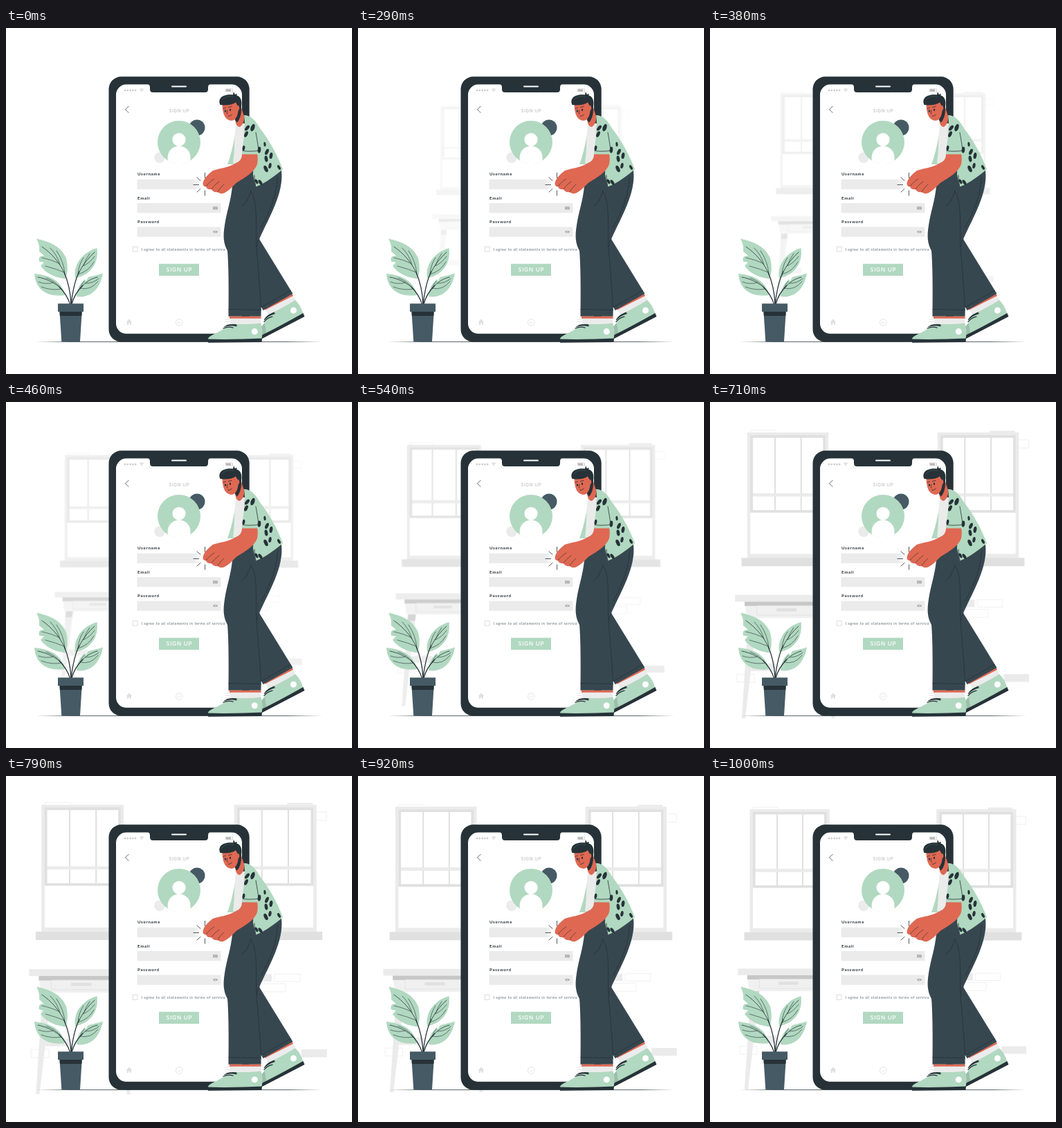
Recreate the animation shown at these times as an HTML page. Size 500 by 500 pixels, loop 1.04 s.

```html
<!DOCTYPE html>
<html lang="en">
<head>
<meta charset="utf-8">
<title>Sign up</title>
<style>
  html, body { margin: 0; width: 100%; height: 100%; overflow: hidden; background: #fff; }
  svg { display: block; width: 100%; height: 100%; }
  text { font-family: Lato, "Open Sans", sans-serif; }
  .ink { fill: #263238; }
  .slate { fill: #455a64; }
  .mint { fill: #b1d8c0; }
  .skin { fill: #df6852; }
  .pale { fill: #ebebeb; }
  .frame { fill: #e0e0e0; }
  .white { fill: #fff; }
  .line { fill: none; stroke: #263238; stroke-width: .8; stroke-linecap: round; stroke-linejoin: round; }
  .fine { stroke-width: .6; }
  .bold { stroke-width: 1.3; }
  .brick { fill: none; stroke: #ebebeb; stroke-width: .7; }
  .label { font-size: 6.2px; font-weight: 700; letter-spacing: .65px; fill: #263238; }
  .caps { font-family: Inter, "Open Sans", sans-serif; font-weight: 500; }
  .icon { fill: none; stroke: #e0e0e0; stroke-width: .9; }
</style>
</head>
<body>
<svg viewBox="0 0 500 500">
  <defs>
    <g id="window">
      <path class="pale" fill-rule="evenodd" d="M57.5 48H172.8V226H57.5ZM62 161.5V220H168V161.5Z"/>
      <path class="frame" d="M62 52H168.5V161.5H62Z"/>
      <path class="white" d="M65.5 55.5H96V134.5H65.5ZM98 55.5H133V134.5H98ZM135 55.5H165V134.5H135ZM65.5 138.5H96V158H65.5ZM98 138.5H133V158H98ZM135 138.5H165V158H135Z"/>
      <path class="pale" d="M65.5 134.5H165V138.5H65.5Z"/>
      <path class="frame" d="M49.5 225.7H181V237.5H49.5Z"/>
    </g>
    <g id="shoe">
      <path class="skin" d="M323 416.800H368.500V420H323Z"/>
      <path class="pale" d="M324.500 419.700H368L369 430H323Z"/>
      <path class="mint" d="M292 450C292 443 311 441 321 429C327 426.500 333 428.500 340 428C350 428 360 427.500 368 426.500C371.500 434 371 444 369 451Z"/>
      <path class="ink" d="M292 449.500C318 450.500 344 449.500 370 448.500L369.500 454L292 454.700Z"/>
      <circle class="white" cx="359.300" cy="438.800" r="4.500"/>
      <path class="line bold" d="M316 431.500Q323 428.500 333 430.500M314 434Q321 431 328 433M319 429.800Q326 428 333 428.800"/>
    </g>
    <radialGradient id="glow">
      <stop offset=".3" stop-color="#fff"/>
      <stop offset="1" stop-color="#fff" stop-opacity="0"/>
    </radialGradient>
    <linearGradient id="floor">
      <stop offset="0" stop-color="#263238" stop-opacity="0"/>
      <stop offset=".12" stop-color="#263238"/>
      <stop offset=".88" stop-color="#263238"/>
      <stop offset="1" stop-color="#263238" stop-opacity="0"/>
    </linearGradient>
  </defs>

  <g id="room" opacity="0">
    <use href="#window"/>
    <use href="#window" transform="translate(500) scale(-1 1)"/>
    <path class="brick" d="M62 48V45H98V48M442 58.300H456.500V70H442M383.600 285H419.400V295.500H383.600ZM363 298.500H399V310H363ZM43 390.500H68V402H43Z"/>
    <path class="pale" d="M401.500 45.500H437V48H401.500ZM360 285H379.700V295.500H360ZM421.300 390.500H457V401.500H421.300ZM63 375.500H97V386H63Z"/>
    <!-- table -->
    <path class="pale" d="M59 310H71.500L54.800 453.300H49.800ZM165 310H177L182 453.300H177Z"/>
    <path fill="#d0d0d0" d="M59.500 311H71.300L70.300 321H58.500Z"/>
    <path fill="#f0f0f0" d="M53.800 288H205V311H57Z"/>
    <path fill="#c7c7c7" d="M53.800 287.500H205V294H53.800Z"/>
    <path class="pale" d="M40.300 278.300H215V287.800H40.300Z"/>
    <path fill="#f0f0f0" stroke="#e0e0e0" stroke-width=".8" d="M71.500 293.500H190V307H71.500Z"/>
    <path class="frame" d="M99 297.300H127.500V301.600H99Z"/>
  </g>

  <path fill="url(#floor)" d="M43 453.300H457V454.100H43Z"/>

  <!-- plant -->
  <g>
    <path class="mint" d="M44 304.500C61 308 80 315 87 333C90 345 89 355 86 362.500C74 361 60 357 50 344L55 338.500L48 337.500C47 333 48 331 50 330L55 329L48 323C49 316 47 310 44 304.500Z"/>
    <path class="mint" d="M131.500 318C134 336 126 356 100 361.500C97 344 108 325 131.500 318Z"/>
    <path class="mint" d="M41 355C59 357 79 362 85.500 386C66 389 43 383 41 355Z"/>
    <path class="mint" d="M140 354.500C136 378 121 391 102 388C102 377 107 369 114 363L115.500 366L119 360C126 358 133 357 140 354.500Z"/>
    <path class="line bold" d="M94 399C93 376 87 360 84 353M94 399C97 376 101 361 106 352M92.500 399C89 388 84 381 77 374M95 399C98 387 104 379 111 372"/>
    <path class="line" d="M84 353C76 337 66 326 52 316M106 352C112 341 119 332 128 324M77 374C68 367 57 362 46 360M111 372C117 366 124 362 132 360"/>
    <path class="line fine" d="M85 356Q84 338 73 322M78 342Q74 328 64 318M84 353Q72 348 57 344M76 340Q66 335 52 332M104 356Q119 352 127 338M111 344Q121 340 128 330M104 356Q105 342 112 332M112 343Q115 334 121 326M80 377Q72 366 58 361M80 377Q66 380 51 374M68 368Q58 371 47 367M107 376Q122 380 133 366M115 369Q126 369 134 362M107 376Q109 370 113 366"/>
    <path class="slate" d="M77.500 410H109.700L107 453.500H80.300Z"/>
    <path class="ink" d="M77.500 410H109.700L109.300 416H77.900Z"/>
    <path class="slate" d="M75 398.300H112V410H75Z"/>
  </g>

  <!-- phone -->
  <g>
    <rect class="ink" x="148.500" y="70.300" width="203.200" height="383.200" rx="18"/>
    <rect class="white" x="159" y="81.600" width="182" height="360.200" rx="15"/>
    <path class="ink" d="M205 81H295Q292 82 292 86V88.500Q292 93 287.500 93H212.500Q208 93 208 88.500V86Q208 82 205 81Z"/>
    <path stroke="#fff" stroke-width="2" stroke-linecap="round" d="M240 84.500H260"/>
    <path stroke="#c7c7c7" stroke-width="2.600" stroke-linecap="round" stroke-dasharray="0 3.800" d="M172 90H187.500"/>
    <path fill="none" stroke="#c7c7c7" stroke-width=".9" d="M193 89Q196 86.500 199 89M194.300 90.400Q196 89 197.700 90.400"/>
    <circle cx="196" cy="91.600" r=".7" fill="#c7c7c7"/>
    <path fill="none" stroke="#c7c7c7" stroke-width=".7" d="M317.500 88H327.500V92H317.500Z"/>
    <path fill="#b5b5b5" d="M318 88.500H325V91.500H318Z"/>
    <path fill="none" stroke="#a6a6a6" stroke-width="1.300" d="M177.500 113L172.400 117.800L177.500 122.600"/>
    <text class="caps" x="235.200" y="122" font-size="6.400" letter-spacing=".6" fill="#c0c0c0">SIGN UP</text>

    <circle class="slate" cx="276" cy="144" r="11.500"/>
    <circle class="pale" cx="222" cy="187.200" r="7.800"/>
    <circle class="mint" cx="250" cy="165" r="31"/>
    <circle class="white" cx="250" cy="161.300" r="9.600"/>
    <path class="white" d="M233.700 191.500V187A16.400 16.500 0 0 1 266.500 187V191.500A31 31 0 0 1 233.700 191.500Z"/>

    <path class="pale" d="M189.500 218.700H310.500V233H189.500ZM189.500 253H310.500V267.300H189.500ZM189.500 287.500H310.500V301.800H189.500Z"/>
    <text class="label" x="190" y="213.300">Username</text>
    <text class="label" x="190" y="247.800">Email</text>
    <text class="label" x="190" y="282.200">Password</text>
    <path fill="#b0b0b0" d="M299 258H306V262.300H299Z"/>
    <path fill="none" stroke="#dcdcdc" stroke-width=".5" d="M299 258L302.500 260.500L306 258"/>
    <ellipse cx="302.500" cy="294.500" rx="3.400" ry="1.700" fill="#b0b0b0"/>
    <circle class="pale" cx="302.500" cy="294.500" r=".8"/>
    <path fill="none" stroke="#d5d5d5" stroke-width=".8" d="M183.200 316.200H190.200V323.200H183.200Z"/>
    <text x="195.500" y="321.700" font-size="5.300" letter-spacing=".5" fill="#5f6d74">I agree to all statements in terms of service</text>
    <path class="mint" d="M221 340.700H279V358H221Z"/>
    <text class="caps" x="231.200" y="352.400" font-size="8.200" letter-spacing=".7" fill="#fff">SIGN UP</text>

    <path class="frame" d="M173.800 425L178 420.500L182.200 425H181V429H179V426.500H177V429H175V425Z"/>
    <circle class="icon" cx="250.300" cy="425.500" r="4.800"/>
    <path class="icon" d="M248 424.700L250.300 427L252.600 424.700M316.500 421H326M316.500 424.500H326M316.500 428H326"/>
    <circle cx="287" cy="226" r="16" fill="url(#glow)"/>
    <path class="line" d="M287.500 209.500V216.500M276 216L281 220.500M271 226.500H278.500M276 237L281 232.500M287.500 235V242M298.500 215.500L294 220"/>
  </g>

  <!-- man -->
  <g>
    <use href="#shoe" transform="translate(431 415) rotate(-27) translate(-370 -452)"/>
    <path fill="#263238" opacity=".15" d="M369 430L374 427L376 440L369 446Z"/>
    <path fill="#37474f" d="M327 229L334 215L360 205L398 206C402 238 380 274 366 305L414.500 384L371.500 408L368.800 403L368.500 416.800H321.500C322 390 322 345 320 322C314 311 313.500 300 316 285C319 265 325 250 327 229Z"/>
    <path class="line" d="M354 236C364 248 361 290 362 316C364 345 367 372 368.500 403M366 305C364 308 363 310 362.500 316M354 236C349 250 346 254 341 257M321.800 406.500L368.500 407.500M369.500 403L411.500 379.500M392 216C393 238 379 270 369 288"/>
    <use href="#shoe"/>

    <path class="mint" d="M335 137C330 156 328 176 320 197L334 197L343 150Z"/>
    <path class="pale" d="M333 136L345 138L344 192L328 196C331 176 329 156 333 136Z"/>
    <path class="mint" d="M344 126C354 126 361 134 367 145C381 163 392 183 400 204C390 213 375 224 361 229.500L357 212L358 183H341C342 165 347 148 344 126Z"/>
    <path class="line" d="M361 151C363 161 364 171 366 180M342 177.500C350 178.500 358 178.500 367 177M359 213C359 219 360 225 361 229"/>
    <g id="spots" class="ink"></g>

    <path class="skin" d="M341 182.500C341 190 337 193 331 196C320 202 308 203 299 206C292 211 287 217 285.500 221C283.500 226 285 229.500 289 229C290 233 294 234 297 233C299 237 303 238 306 237C309 240 314 240 317 237.500C325 233 329 227 334 223C346 216 359 208 363 197C364 191 364 186 363 182.500Z"/>
    <path class="line fine" d="M289 229C293 224 296 221 301 218M297 233C300 228 304 225 308 222M306 237C308 232 312 229 315 226"/>

    <!-- head -->
    <path class="skin" d="M331 130L339 112L344 127C345 136 341 142 337 143C334 142 332 139 331.500 135Z"/>
    <path class="skin" d="M312.500 107C312.500 118 314 128 320 132C326 136 333 133 336 126L339 112L331 104Z"/>
    <path class="ink" d="M339.500 112C341 121 339 131 334 136.500C332 135 331 133 331 131.500C335 128 336 120 336 112Z"/>
    <path class="ink" d="M309.500 111C305.500 102 313 95 328 96.500L329 92L330.800 96L334 95L333.300 97.500C340 99 341.500 107 339.700 115L336.500 116C334.500 112 333 109 332 107.500C325 112 317 112 309.500 111Z"/>
    <ellipse class="skin" cx="335" cy="115.500" rx="2.200" ry="3.600"/>
    <ellipse class="ink" cx="317" cy="120" rx="1.100" ry="1.800"/>
    <ellipse class="ink" cx="324" cy="118.300" rx="1.100" ry="1.800"/>
    <path class="line" d="M314 116.500L317.500 115M321.500 114.500L326 113.500M320 119C319 122 318.500 123.500 320.500 124M321 127.500Q324.500 127.500 326.500 125"/>
    <path class="line fine" style="stroke:#455a64" d="M312 104C316 99 323 97.500 329 99.500"/>
  </g>
</svg>
<script>
  const LOOP = 1040, STEP = 41.6;
  const room = document.getElementById("room");

  // x, y, size, tilt of each shirt spot
  const spots = [[356.5, 144, 1.2, 20], [348.5, 144.5, 1, 40], [347, 153.5, 1, 25],
    [343.5, 173.5, .8, 10], [366, 176, 1, 5], [374, 168, .7, -5], [377, 179, 1, 25],
    [383, 184.5, 1, 10], [376, 189, 1, -10], [375.5, 203.5, 1.1, -25], [381.5, 199, .9, 10],
    [394.5, 201.5, .8, -30], [367.5, 223, .9, -35], [362, 222, .8, -30]];
  document.getElementById("spots").innerHTML = spots.map(([x, y, s, tilt]) =>
    `<ellipse rx="2.3" ry="4.6" transform="translate(${x} ${y}) rotate(${tilt}) scale(${s})"/>`).join("");

  const cubic = (a, b, u) => 3 * (1 - u) ** 2 * u * a + 3 * (1 - u) * u * u * b + u ** 3;

  // cubic-bezier(.36, -.01, .5, 1.38), overshooting before it settles
  function ease(x) {
    if (x >= 1) return 1;
    let lo = 0, hi = 1;
    for (let i = 0; i < 24; i++) {
      const mid = (lo + hi) / 2;
      if (cubic(.36, .5, mid) < x) lo = mid; else hi = mid;
    }
    return cubic(-.01, 1.38, lo);
  }

  const start = performance.now();

  function draw() {
    const t = (performance.now() - start) % LOOP;
    const step = Math.min(24, Math.floor((t + 4) / STEP));
    const p = step ? ease((step * STEP + 28) / 1000) : 0;
    room.setAttribute("opacity", Math.max(0, Math.min(1, p)));
    room.setAttribute("transform", `translate(250 250) scale(${.5 + p / 2}) translate(-250 -250)`);
    requestAnimationFrame(draw);
  }
  draw();
</script>
</body>
</html>
```
